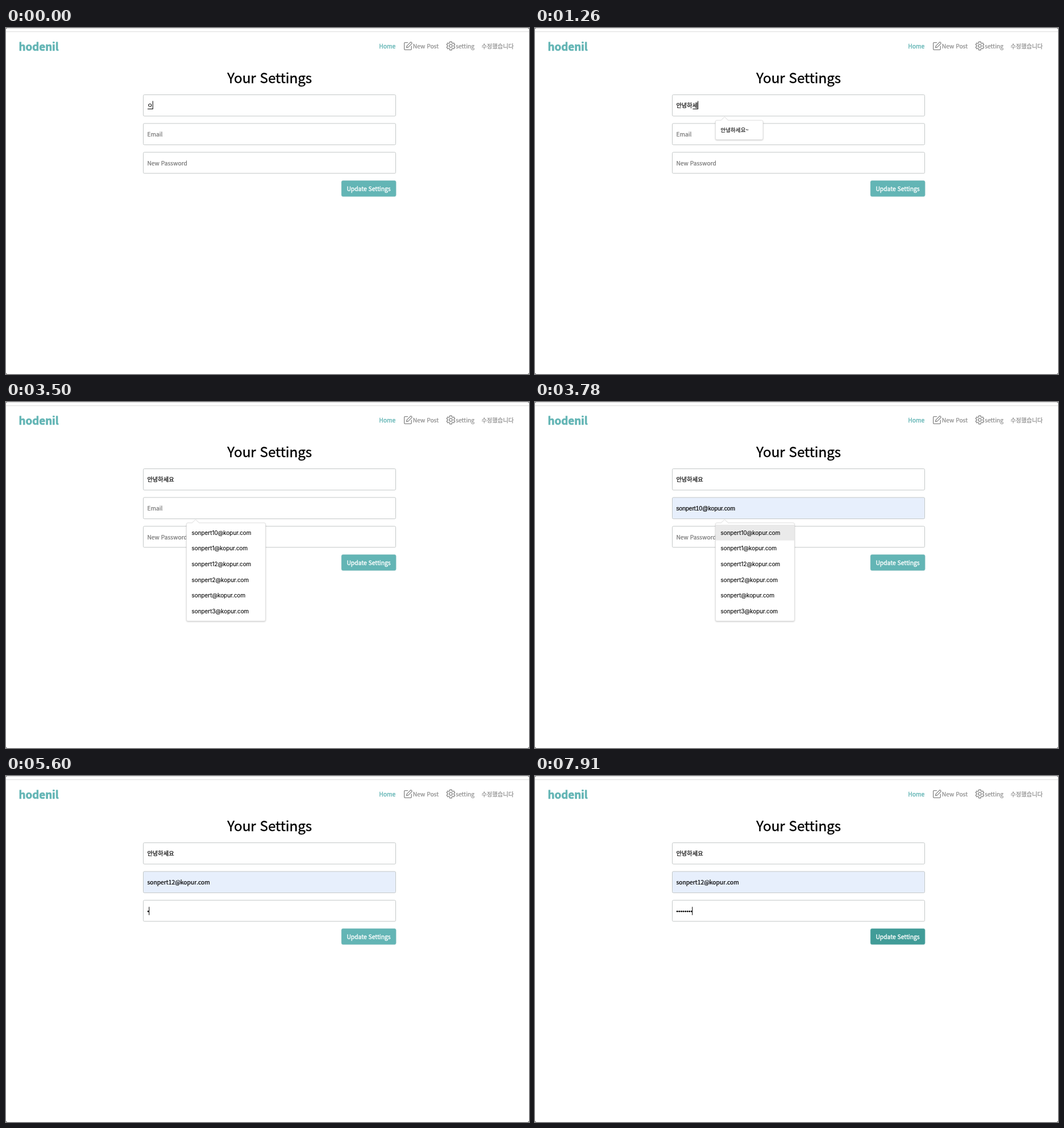
Recreate the animation shown at these times as an HTML page. Size 920 by 609 pixels, loop 8000 ms.

```html
<!DOCTYPE html>
<html lang="ko">
<head>
<meta charset="utf-8">
<title>Settings form</title>
<style>
html, body { margin: 0; width: 100%; height: 100%; overflow: hidden; background: #fff; }
svg { display: block; width: 920px; height: 609px; }
text { font: 10.3px "Noto Sans CJK KR", "Noto Sans CJK", sans-serif; white-space: pre; color: #000; fill: currentColor; stroke: currentColor; stroke-width: .22px; }
.logo { font-size: 18.7px; font-weight: 900; color: #63b5b5; stroke-width: .7px; }
.title { font-size: 24.2px; stroke-width: .4px; }
.nav { color: #8a8a8a; }
.home { color: #63b5b5; stroke-width: .35px; }
.hint { color: #757575; }
.btn { color: #fff; stroke-width: .35px; }
.pop text { font: 9.9px Inter, "Noto Sans CJK KR", sans-serif; stroke-width: .1px; }
.pop .ko { font: 9.6px "Noto Sans CJK KR", "Noto Sans CJK", sans-serif; }
.plain { font-family: "Liberation Sans", sans-serif; }
.field { fill: #fff; stroke: #c3c7c7; }
.icon { fill: none; stroke: #858585; stroke-width: 1.3; stroke-linejoin: round; stroke-linecap: round; }
.card { fill: #fff; stroke: #dcdcdc; stroke-width: .8; filter: drop-shadow(0 1px 1px rgba(0,0,0,.2)); }
</style>
</head>
<body>
<svg viewBox="0 0 920 609">
  <rect width="920" height="609" fill="#fff"/>
  <path d="M0 .5H920" stroke="#d6d6d6"/>
  <path d="M0 6.5H920" stroke="#dedede"/>
  <path d="M0 0h2L0 2zM920 0h-2l2 2zM0 609v-2l2 2zM920 609v-2l-2 2z" fill="#777"/>

  <text class="logo" x="22.6" y="39.5">hodenil</text>
  <text class="home" x="656.3" y="36">Home</text>
  <path class="icon" d="M706.5 25.7H702Q700.6 25.7 700.6 27.1V37Q700.6 38.4 702 38.4H711.8Q713.2 38.4 713.2 37V32M704.6 34.6L705.1 31.6L711.6 25.1Q712.2 24.5 712.9 25.1L713.9 26.1Q714.5 26.8 713.9 27.4L707.5 33.9Z"/>
  <text class="nav" x="715.8" y="36">New Post</text>
  <path class="icon" id="gear"/>
  <circle class="icon" cx="782.4" cy="31.5" r="2.6"/>
  <text class="nav" x="791.2" y="36">setting</text>
  <text class="nav" x="836.4" y="36">수정했습니다</text>

  <text class="title" x="463.7" y="97" text-anchor="middle">Your Settings</text>
  <rect class="field" x="241.5" y="117.5" width="444" height="37.5" rx="2"/>
  <rect class="field" id="mailBox" x="241.5" y="168" width="444" height="37.6" rx="2"/>
  <rect class="field" x="241.5" y="218.7" width="444" height="37.1" rx="2"/>
  <text id="user" x="248.4" y="139.8"></text>
  <text id="mail" x="248.4" y="190.9"></text>
  <text id="passHint" class="hint" x="248.4" y="241.6">New Password</text>
  <g id="dots"></g>
  <path id="under" stroke="#000"/>
  <path id="caret" stroke="#000"/>

  <rect id="btn" x="590" y="268.5" width="96.2" height="28.2" rx="3" stroke="#a9cccc" stroke-width=".5"/>
  <text class="btn" x="638" y="286.7" text-anchor="middle">Update Settings</text>

  <g class="pop" id="userPop">
    <path class="card" d="M320 162.5H327.5L333.5 156.5L339.5 162.5H398.5Q401 162.5 401 165V194Q401 196.5 398.5 196.5H320Q317.5 196.5 317.5 194V165Q317.5 162.5 320 162.5Z"/>
    <text class="ko" x="326.4" y="183">안녕하세요~</text>
  </g>
  <g class="pop" id="mailPop">
    <path class="card" d="M320 212.8H327.5L333.5 207L339.5 212.8H454Q456.5 212.8 456.5 215.3V383Q456.5 385.5 454 385.5H320Q317.5 385.5 317.5 383V215.3Q317.5 212.8 320 212.8Z"/>
    <rect id="hover" x="318" width="138" height="27.7" fill="#eaeaea"/>
  </g>
</svg>
<script>
const $ = id => document.getElementById(id);
const NS = 'http://www.w3.org/2000/svg';
const LOOP = 8000, ROW = 27.7, CHAR = 9.47, DOT = 3.57, LEFT = 248.8;
const mails = ['10', '1', '12', '2', '', '3'].map(n => `sonpert${n}@kopur.com`);

// Each step merges into the state before it.
const steps = [
  [0, { user: 'ㅇ', compose: true, focus: 'user', caret: true, pop: '', row: -1, mail: '', plain: false, dots: 0, btn: '#63b5b5' }],
  [70, { user: '아' }],
  [140, { user: '안' }],
  [210, { pop: 'user' }],
  [350, { user: '안ㄴ', pop: '' }],
  [490, { user: '안녀' }],
  [630, { user: '안녕' }],
  [700, { pop: 'user' }],
  [770, { user: '안녕ㅎ' }],
  [840, { pop: '' }],
  [980, { user: '안녕하' }],
  [1050, { pop: 'user' }],
  [1120, { user: '안녕핫', pop: '' }],
  [1260, { user: '안녕하세', pop: 'user' }],
  [1330, { user: '안녕하셍' }],
  [1540, { user: '안녕하세요' }],
  [1890, { compose: false, focus: 'mail' }],
  [2380, { caret: false }],
  [2870, { caret: true, pop: '' }],
  [3010, { pop: 'mail' }],
  [3500, { caret: false }],
  [3780, { row: 0, mail: mails[0], plain: true }],
  [4060, { caret: true }],
  [4130, { row: 1, mail: mails[1] }],
  [4200, { row: 2, mail: mails[2] }],
  [4550, { caret: false }],
  [4760, { pop: '' }],
  [4830, { plain: false, caret: true, focus: 'mailEnd' }],
  [5180, { focus: 'pass' }],
  [5600, { dots: 1 }],
  [5950, { dots: 2 }],
  [6090, { dots: 3 }],
  [6440, { dots: 4 }],
  [6720, { dots: 5 }],
  [7000, { dots: 6 }],
  [7280, { dots: 7 }],
  [7630, { dots: 8 }],
  [7840, { btn: '#51a8a6' }],
  [7910, { btn: '#419c98' }]
];

function add(parent, tag, attrs, text = '') {
  const el = document.createElementNS(NS, tag);
  for (const k in attrs) el.setAttribute(k, attrs[k]);
  el.textContent = text;
  parent.append(el);
  return el;
}

function gearPath() {
  const pts = [];
  for (let i = 0; i < 6; i++)
    for (const [deg, r] of [[-19, 5.7], [-14, 7.5], [14, 7.5], [19, 5.7]]) {
      const a = (i * 60 + deg - 90) * Math.PI / 180;
      pts.push((782.4 + r * Math.cos(a)).toFixed(2) + ' ' + (31.5 + r * Math.sin(a)).toFixed(2));
    }
  return 'M' + pts.join('L') + 'Z';
}

$('gear').setAttribute('d', gearPath());
mails.forEach((m, i) => add($('mailPop'), 'text', { x: 326.6, y: 233.6 + i * ROW }, m));
const dots = Array.from({ length: 8 }, (_, i) =>
  add($('dots'), 'circle', { cx: 250.2 + i * DOT, cy: 238.3, r: 1.4 }));

const show = (el, on) => el.setAttribute('visibility', on ? 'visible' : 'hidden');

function caretPos(s) {
  if (s.focus === 'user') return [LEFT + s.user.length * CHAR, 128.5];
  if (s.focus === 'mail') return [248.5, 179.5];
  if (s.focus === 'mailEnd') return [248.6 + $('mail').getComputedTextLength(), 179.5];
  return [s.dots ? 248.2 + s.dots * DOT : 248.5, 230.3];
}

function draw(s) {
  $('user').textContent = s.user;
  $('mail').textContent = s.mail || 'Email';
  $('mail').setAttribute('class', s.mail ? (s.plain ? 'plain' : '') : 'hint');
  $('mailBox').style.fill = s.mail ? '#e7effc' : '#fff';
  show($('passHint'), !s.dots);
  dots.forEach((d, i) => show(d, i < s.dots));

  const end = LEFT + s.user.length * CHAR;
  $('under').setAttribute('d', `M${end - CHAR + .3} 142.5H${end}`);
  show($('under'), s.compose);

  const [x, y] = caretPos(s);
  $('caret').setAttribute('d', `M${x} ${y}v14.5`);
  show($('caret'), s.caret);

  show($('userPop'), s.pop === 'user');
  show($('mailPop'), s.pop === 'mail');
  show($('hover'), s.pop === 'mail' && s.row >= 0);
  $('hover').setAttribute('y', 216 + Math.max(0, s.row) * ROW);
  $('btn').setAttribute('fill', s.btn);
}

const start = performance.now();
function tick() {
  const t = Math.max(0, performance.now() - start) % LOOP;
  const state = {};
  for (const [at, change] of steps) if (at <= t) Object.assign(state, change);
  draw(state);
  requestAnimationFrame(tick);
}
tick();
</script>
</body>
</html>
```
